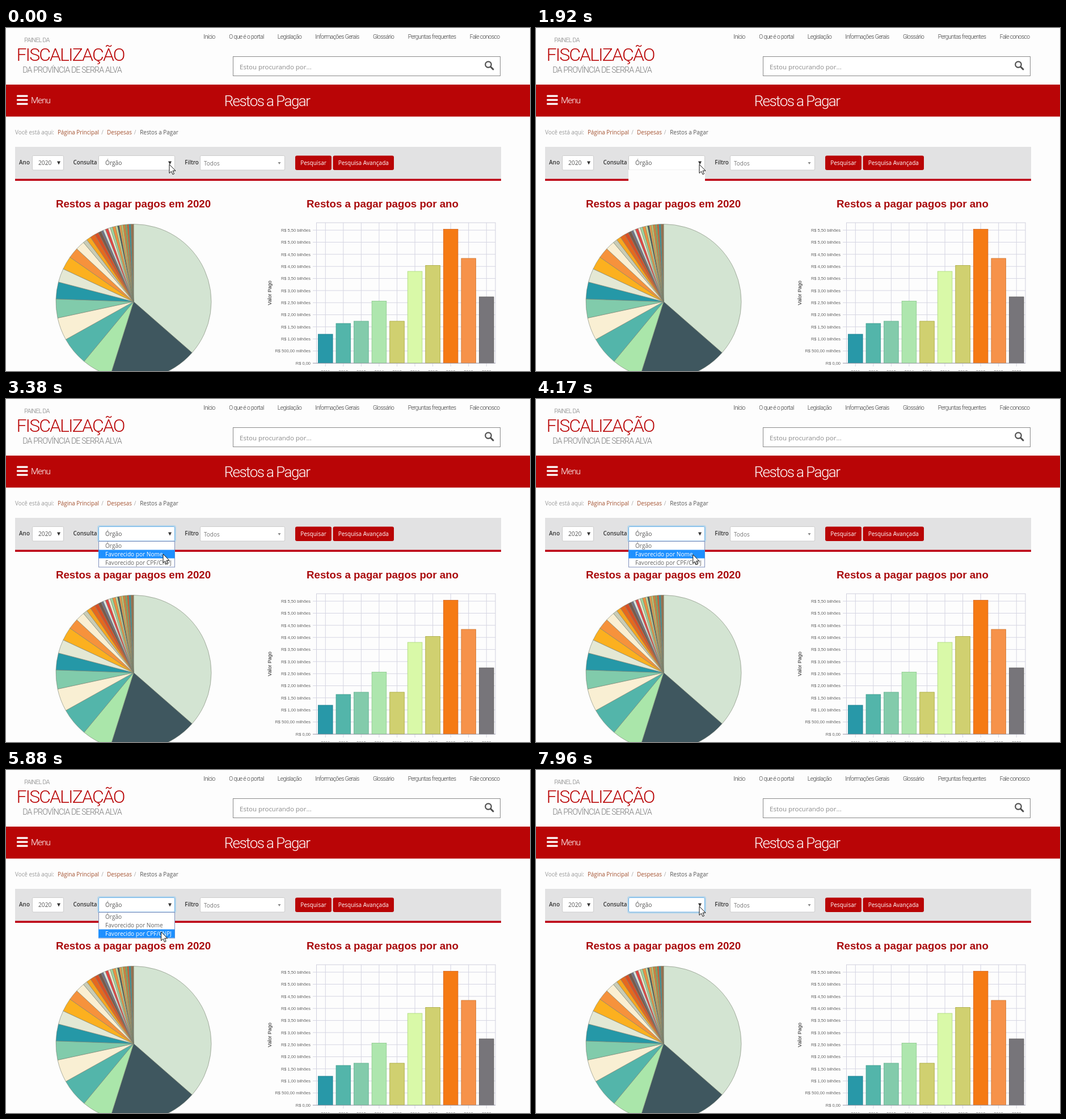
Recreate the animation shown at these times as an HTML page. Size 924 by 606 pixels, loop 8000 ms.

```html
<!DOCTYPE html>
<html lang="pt">
<head>
<meta charset="utf-8">
<title>Restos a Pagar</title>
<style>
html, body { margin: 0; width: 100%; height: 100%; overflow: hidden; background: #fdfdfd; }
svg { display: block; width: 924px; height: 606px; }
text { white-space: pre; }
.ui { font-family: "Open Sans", "Noto Sans", sans-serif; }
.thin { font-family: Roboto, sans-serif; font-weight: 300; letter-spacing: -.06em; }
.arial { font-family: "Liberation Sans", Arial, sans-serif; }
</style>
</head>
<body>
<svg id="stage" viewBox="0 0 924 606" xmlns="http://www.w3.org/2000/svg"></svg>
<script>
const stage = document.getElementById("stage");
const RED = "#b90506";
let layer = stage;

function add(tag, attrs, content) {
  const el = document.createElementNS("http://www.w3.org/2000/svg", tag);
  for (const k in attrs) el.setAttribute(k, attrs[k]);
  if (content !== undefined) el.textContent = content;
  layer.appendChild(el);
  return el;
}
const rect = (x, y, width, height, fill, more) => add("rect", { x, y, width, height, fill, ...more });
const path = (d, more) => add("path", { d, fill: "none", ...more });
const label = (cls, s, x, y, size, fill, more) =>
  add("text", { class: cls, x, y, "font-size": size, fill, ...more }, s);
const mid = { "text-anchor": "middle" };
const end = { "text-anchor": "end" };

function group(draw) {
  const outer = layer;
  const g = layer = add("g", {});
  draw();
  layer = outer;
  return g;
}

function header() {
  label("thin", "PAINEL DA", 54.5, 25, 10.5, "#777", mid);
  label("thin", "FISCALIZAÇÃO", 113.5, 58, 32, RED, mid);
  label("thin", "DA PROVÍNCIA DE SERRA ALVA", 116.5, 79, 14.2, "#777", mid);

  const nav = [["Início", 358.5], ["O que é o portal", 424], ["Legislação", 500], ["Informações Gerais", 584],
    ["Glossário", 665.5], ["Perguntas frequentes", 751], ["Fale conosco", 844]];
  for (const [s, x] of nav) label("thin", s, x, 19, 10.3, "#333", mid);

  rect(400.5, 50.5, 471, 34, "#fff", { stroke: "#8a8a8a" });
  label("ui", "Estou procurando por...", 412, 72.5, 11.5, "#8c8c8c");
  add("circle", { cx: 850.5, cy: 64.5, r: 5.2, fill: "none", stroke: "#4f4f4f", "stroke-width": 2.2 });
  path("M854.5 68.5L859 73", { stroke: "#4f4f4f", "stroke-width": 3, "stroke-linecap": "round" });

  rect(0, 100, 924, 56.5, RED);
  for (const y of [118.5, 125.5, 132.5]) rect(19, y, 19.5, 3.2, "#fff", { rx: 1 });
  label("thin", "Menu", 61, 133, 15.2, "#fff", mid);
  label("thin", "Restos a Pagar", 460, 138, 26, "#fff", mid);
}

function breadcrumb() {
  const parts = [["Você está aqui:", 50.5, "#999"], ["Página Principal", 127.5, "#a3502e"], ["/", 170, "#aaa"],
    ["Despesas", 200, "#a3502e"], ["/", 227.5, "#aaa"], ["Restos a Pagar", 270, "#555"]];
  for (const [s, x, c] of parts) label("ui", s, x, 188, 9.9, c, mid);
}

const arrow = (x, y, w, h, fill) => path(`M${x - w} ${y}h${2 * w}l${-w} ${h}z`, { fill });
const box = (x, w) => rect(x + .5, 225.5, w - 1, 25.5, "#fff", { stroke: "#ccc", rx: 2 });

function filters() {
  rect(16, 210, 857, 57, "#e2e2e3");
  rect(16, 266.5, 857, 3.5, "#bd0714");
  const names = [["Ano", 32.5], ["Consulta", 139.5], ["Filtro", 327.5]];
  for (const [s, x] of names) label("ui", s, x, 241, 9.9, "#333", { ...mid, "font-weight": 600 });
  box(46, 56);
  label("ui", "2020", 57, 242, 10.2, "#555");
  arrow(93, 235.5, 3, 6, "#333");
  box(163, 135);
  box(342, 150);
  label("ui", "Todos", 349, 242.5, 10, "#777");
  arrow(482, 237, 2.5, 4, "#888");
  for (const [s, x, w] of [["Pesquisar", 510, 64], ["Pesquisa Avançada", 576.5, 107.5]]) {
    rect(x, 225.5, w, 25.5, RED, { rx: 3 });
    label("ui", s, x + w / 2, 242, 10, "#fff", mid);
  }
}

function pie() {
  const cx = 225, cy = 483.5, r = 137;
  const at = deg => {
    const a = deg * Math.PI / 180;
    return `${(cx + r * Math.sin(a)).toFixed(2)} ${(cy - r * Math.cos(a)).toFixed(2)}`;
  };
  const slices = [[131.2, "#d3e4d2"], [197.5, "#3f575f"], [219.6, "#aae6aa"], [240.8, "#53b5aa"], [257.8, "#f9efd3"],
    [272, "#81cbab"], [284.7, "#2598a7"], [295, "#e4e8d4"], [305, "#fcb01f"], [313, "#f6923c"], [319.8, "#faefd2"],
    [323, "#c9ccb6"], [326.3, "#f8a81f"], [330, "#e5681f"], [333, "#d64f28"], [335.3, "#775a4c"], [337, "#707086"],
    [338.7, "#dbe6e2"], [340.8, "#e54343"], [342.5, "#f6e9d2"], [344.3, "#9fd99f"], [346.5, "#ee9140"],
    [348, "#c5dd9a"], [349.3, "#46575c"], [350.8, "#e59a48"], [352.2, "#bfc870"], [353.8, "#d8803a"],
    [355.2, "#7fa865"], [356.5, "#d65a30"], [358, "#3f8f94"], [360, "#95704f"]];
  let from = 0;
  for (const [to, fill] of slices) {
    path(`M${cx} ${cy}L${at(from)}A${r} ${r} 0 0 1 ${at(to)}Z`,
      { fill, stroke: "#77806f", "stroke-width": .6, "stroke-linejoin": "round" });
    from = to;
  }
}

function bars() {
  const base = 592, step = 21.35, pitch = 31.55, first = 563.3;
  for (let i = 0; i <= 11; i++) {
    const y = base - i * step;
    path(`M541 ${y}H863`, { stroke: "#d5d5e2" });
    const s = i === 0 ? "R$ 0,00" : i === 1 ? "R$ 500,00 milhões"
      : `R$ ${(i / 2).toFixed(2).replace(".", ",")} bilhões`;
    label("arial", s, 537, y + 2.7, 7.5, "#666", end);
  }
  const data = [[541, "#2898a8"], [522, "#53b5aa"], [518, "#83cbab"], [482.5, "#aee6ae"], [518, "#d0d070"],
    [430, "#d9f9a8"], [419.5, "#d0d070"], [355.5, "#f57a14"], [407, "#f6924a"], [475, "#77757a"]];
  const edges = ["#1f7f90", "#3a9c8c", "#5fae8c", "#88c888", "#a8a83c", "#a8d878", "#a8a83c", "#d4601c", "#d0742c", "#5f5d5c"];
  data.forEach((d, i) => path(`M${first + i * pitch} 344V598`, { stroke: "#d5d5e2" }));
  rect(547.5, 344, 315.5, 248, "none", { stroke: "#d0d0de" });
  data.forEach(([top, fill], i) => {
    const x = first + i * pitch;
    rect(x - 12.8, top, 25.6, base - top, fill, { stroke: edges[i], "stroke-width": .8 });
    label("arial", 2011 + i, x, 610, 7.5, "#666", mid);
  });
  path("M541 592.3H863", { stroke: "#a9a9b4" });
  label("arial", "Valor Pago", 0, 0, 8.9, "#222", { ...mid, transform: "translate(467.5 468) rotate(-90)" });
}

header();
breadcrumb();
filters();
for (const [s, x] of [["Restos a pagar pagos em 2020", 224.5], ["Restos a pagar pagos por ano", 664]])
  label("arial", s, x, 317, 18.7, "#a90b0d", { ...mid, "font-weight": 700 });
pie();
bars();

const glow = group(() => {
  rect(162, 224, 137, 28.5, "none", { stroke: "#a9d3ee", "stroke-width": 2, rx: 3, opacity: .7 });
  rect(163.5, 225.5, 134, 25.5, "#fff", { stroke: "#66afe9", rx: 2 });
});
label("ui", "Órgão", 175, 242, 10.2, "#555");
arrow(289, 235.5, 3, 6, "#333");

const blank = rect(163, 250.5, 135, 46.5, "#fdfdfd");
const options = ["Órgão", "Favorecido por Nome", "Favorecido por CPF/CNPJ"];
let mark, rows;
const list = group(() => {
  rect(163.5, 251.5, 134, 45.5, "#fff", { stroke: "#7f8fbb" });
  mark = rect(163, 251.5, 134.5, 15, "#1e90ff");
  rows = options.map((s, i) => label("ui", s, 175, 262.5 + 15 * i, 10.1, "#666"));
});
const cursor = path("M0 0V15.5L3.6 12.2L6 17.7L8.5 16.6L6.1 11.2H11Z",
  { fill: "#fff", stroke: "#111", "stroke-width": 1, "stroke-linejoin": "round" });

// [time, x, y] of the pointer tip
const moves = [[0, 288, 241], [2420, 288, 241], [3000, 280, 265], [3380, 277, 274], [4080, 277, 274], [4700, 272.5, 291],
  [5750, 272.5, 291], [6400, 283, 244], [6580, 283, 244], [6900, 288, 241], [8000, 288, 241]];
// [time, highlighted option]
const picks = [[0, 0], [3080, 1], [4400, 2], [5920, 1], [6160, 0]];

const ease = u => u * u * (3 - 2 * u);
function pointer(t) {
  const i = moves.findIndex(m => m[0] > t);
  const [t0, x0, y0] = moves[i - 1], [t1, x1, y1] = moves[i];
  const u = ease((t - t0) / (t1 - t0));
  return [x0 + (x1 - x0) * u, y0 + (y1 - y0) * u];
}
const show = (el, on) => el.setAttribute("visibility", on ? "visible" : "hidden");

function render(t) {
  show(glow, t >= 2250);
  show(blank, t >= 1920 && t < 2000);
  show(list, t >= 2000 && t < 6700);
  const pick = picks.filter(p => p[0] <= t).pop()[1];
  mark.setAttribute("y", 251.5 + 15 * pick);
  rows.forEach((r, i) => r.setAttribute("fill", i === pick ? "#fff" : "#666"));
  cursor.setAttribute("transform", `translate(${pointer(t).join(" ")})`);
}

const start = performance.now();
function tick(now) {
  render(Math.max(0, now - start) % 8000);
  requestAnimationFrame(tick);
}
render(0);
requestAnimationFrame(tick);
</script>
</body>
</html>
```
